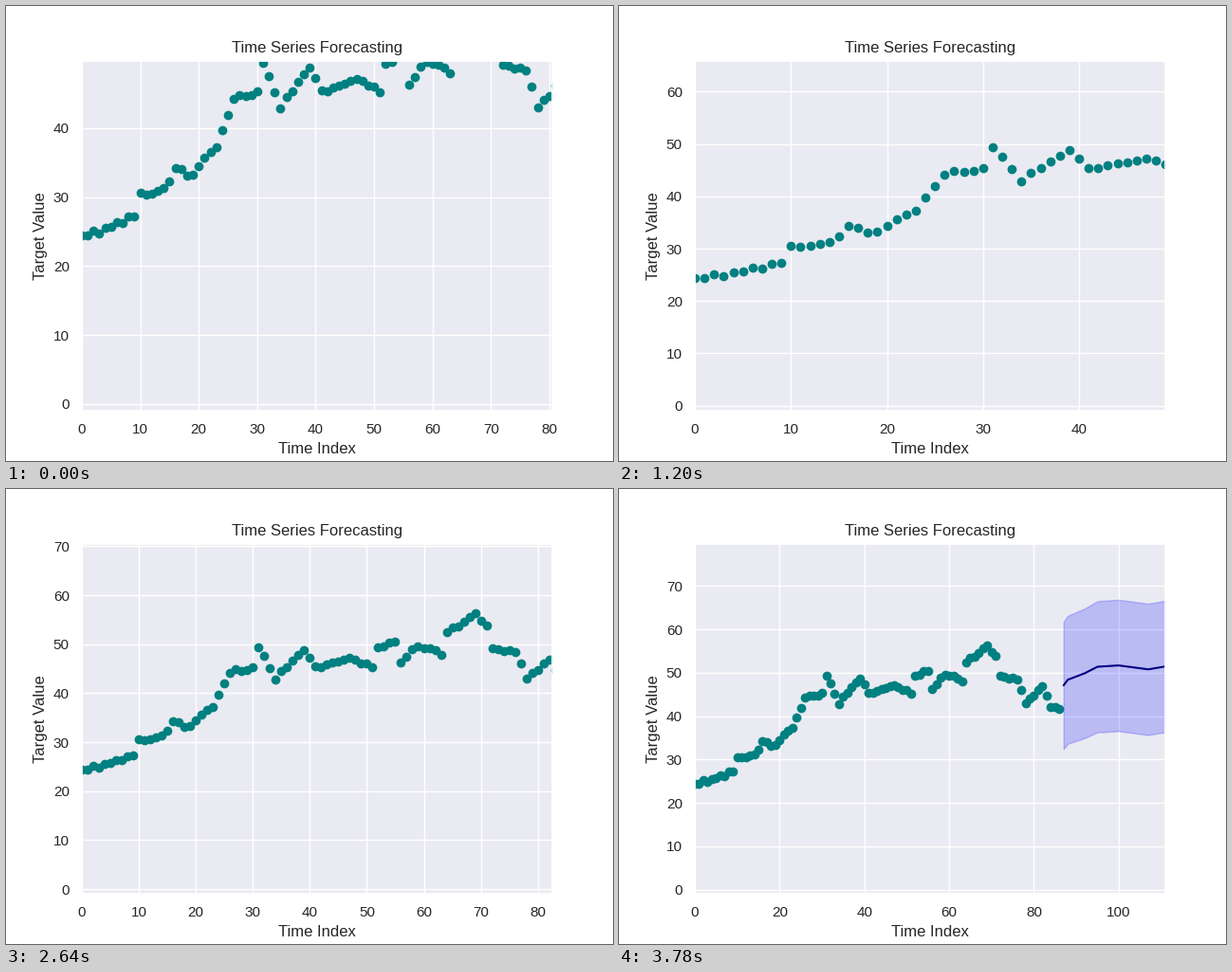
Recreate the animation shown at these times as a matplotlib script. Size 640 px wide and 480 px high, loop 3840 ms.

```python
import numpy as np
import matplotlib.pyplot as plt
from matplotlib.animation import FuncAnimation

FRAMES = 64
INTERVAL = 60
INK = "#262626"
SPLIT = 87  # first forecast index

plt.rcParams.update({
    "font.family": "Liberation Sans",
    "font.size": 12,
    "text.color": INK,
    "axes.labelcolor": INK,
    "axes.titlesize": 12,
    "axes.labelsize": 12,
    "axes.facecolor": "#EAEAF2",
    "axes.edgecolor": "white",
    "axes.linewidth": 1.25,
    "axes.axisbelow": True,
    "axes.grid": True,
    "grid.color": "white",
    "grid.linewidth": 1,
    "lines.linewidth": 1.5,
    "lines.solid_capstyle": "round",
    "patch.linewidth": 1,
    "xtick.bottom": False,
    "ytick.left": False,
})
for tick in ("xtick", "ytick"):
    plt.rcParams.update({
        f"{tick}.color": INK,
        f"{tick}.labelsize": 11,
        f"{tick}.major.size": 6,
        f"{tick}.major.width": 1.25,
    })


def through(points, x):
    """Straight segments through (index, value) key points."""
    return np.interp(x, *zip(*points))


# Turning points of the series; seeded jitter roughens the stretches between.
trend = [
    (0, 24.1), (9, 27.2), (10, 30.3), (14, 30.9), (16, 33.9), (19, 33.2),
    (23, 37.5), (26, 44.2), (30, 45.3), (31, 49.3), (34, 43.0), (39, 49.0),
    (41, 45.2), (46, 47.1), (51, 45.6), (52, 49.0), (55, 50.7), (56, 46.4),
    (59, 49.7), (63, 48.0), (64, 52.6), (69, 56.0), (71, 54.2), (72, 49.0),
    (76, 48.7), (78, 43.0), (82, 47.0), (84, 42.3), (86, 41.7),
]
past = np.arange(SPLIT)
rng = np.random.default_rng(4)
observed = through(trend, past) + rng.uniform(-0.4, 0.4, SPLIT)

future = np.arange(SPLIT, 114)
forecast = through([(87, 47.1), (88, 48.4), (92, 49.9), (95, 51.4),
                    (100, 51.7), (107, 50.8), (113, 51.8)], future)
spread = 14.7 + 0.05 * np.minimum(future - SPLIT, 9)

fig, ax = plt.subplots(figsize=(6.4, 4.8), dpi=100)
ax.scatter(past, observed, color="teal")
ax.plot(future, forecast, color="navy")
ax.fill_between(future, forecast - spread, forecast + spread,
                color="blue", alpha=0.2)
ax.set_title("Time Series Forecasting")
ax.set_xlabel("Time Index")
ax.set_ylabel("Target Value")


def view_limits(n):
    """Right and top edge: a steady pan plus a decaying settle-in."""
    settle = 0.85 ** n
    right = 16.5 + 1.5 * n + 64 * settle
    # The view rises faster once the forecast band is in sight.
    top = 65.5 + 0.00262 * n ** 2 + 0.325 * max(n - 51, 0) - 15.7 * settle
    return right, top


def update(n):
    right, top = view_limits(n)
    ax.set_xlim(0, right)
    ax.set_ylim(-1, top)
    return []


anim = FuncAnimation(fig, update, frames=FRAMES, interval=INTERVAL,
                     init_func=lambda: update(0), repeat=True, repeat_delay=0)
plt.show()
```
